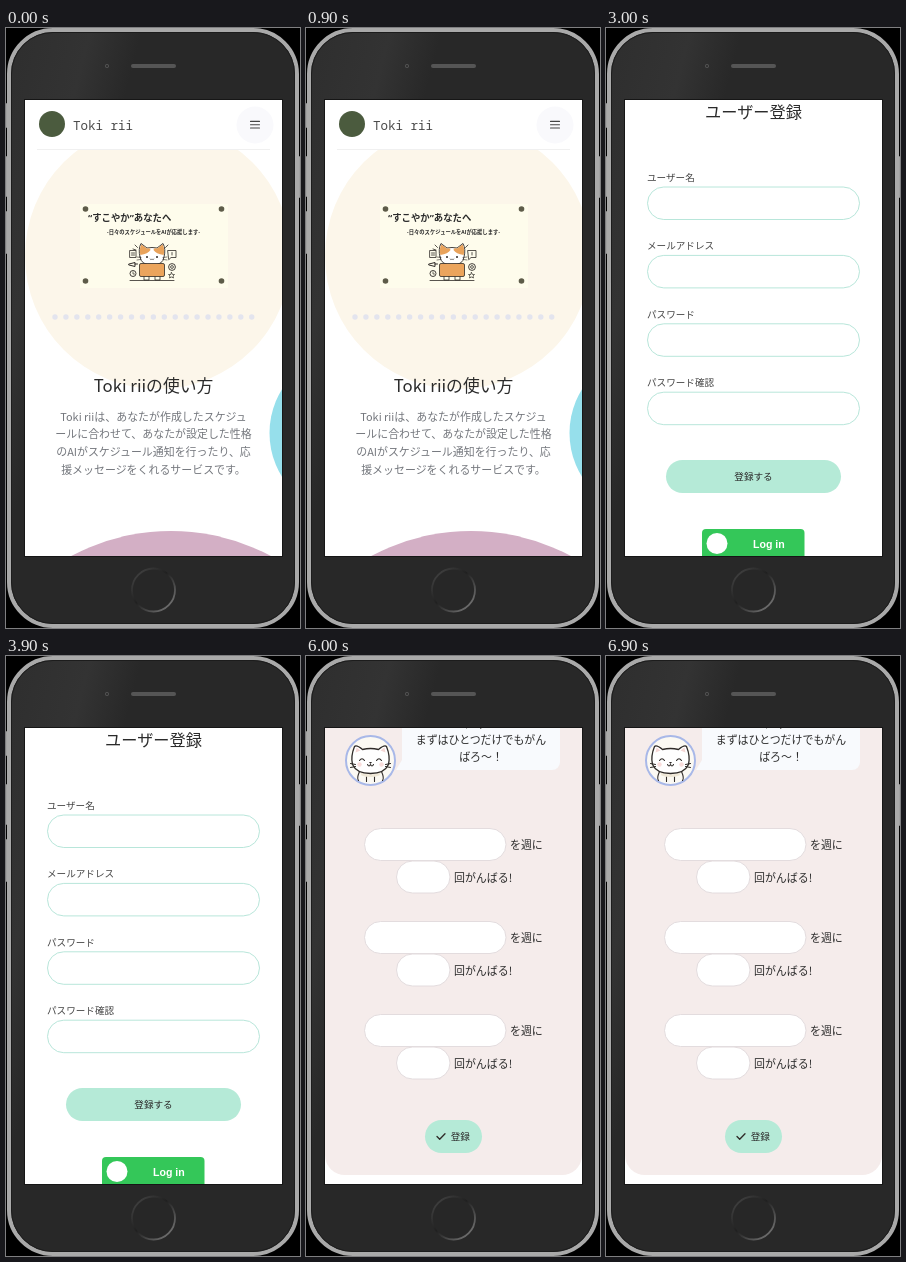
Recreate the animation shown at these times as an HTML page. Size 294x600 px, loop 7.5 s.

```html
<!DOCTYPE html>
<html lang="ja">
<head>
<meta charset="utf-8">
<title>Phone demo</title>
<style>
html, body { margin: 0; width: 100%; height: 100%; overflow: hidden; background: #000; }
svg { display: block; width: 294px; height: 600px; }
text { font-family: "Noto Sans CJK JP", "Noto Sans", sans-serif; fill: #2b2b2b; }
.mono { font-family: "Noto Sans Mono", monospace; }
.banner { font-family: "Open Sans", "Noto Sans CJK JP", sans-serif; }
.latin { font-family: "Liberation Sans", Arial, sans-serif; }
.ink { fill: none; stroke: #2f2b28; stroke-linecap: round; stroke-linejoin: round; }
</style>
</head>
<body>
<svg id="stage" viewBox="0 0 294 600"></svg>
<script>
const STEP = 1500;
const NAME = 'Toki rii';

const text = (x, y, size, str, attrs = '') =>
  `<text x="${x}" y="${y}" font-size="${size}" ${attrs}>${str}</text>`;
const mid = (x, y, size, str, attrs = '') => text(x, y, size, str, `text-anchor="middle" ${attrs}`);
const rect = (x, y, w, h, r, fill, attrs = '') =>
  `<rect x="${x}" y="${y}" width="${w}" height="${h}" rx="${r}" fill="${fill}" ${attrs}/>`;
const circle = (x, y, r, fill, attrs = '') =>
  `<circle cx="${x}" cy="${y}" r="${r}" fill="${fill}" ${attrs}/>`;
const ink = (d, width = 1, attrs = '') => `<path class="ink" stroke-width="${width}" d="${d}" ${attrs}/>`;
const at = (x, y, body) => `<g transform="translate(${x} ${y})">${body}</g>`;
const lines = (x, y, gap, size, rows, attrs) =>
  rows.map((row, i) => mid(x, y + i * gap, size, row, attrs)).join('');
const field = (x, y, w, h, stroke) => rect(x, y, w, h, h / 2, '#fff', `stroke="${stroke}"`);
const check = (x, y) => ink(`M${x - 4} ${y}l2.7 2.8 5.3-5.6`, 1.3);

const header = dy => at(0, dy,
  circle(46, 96, 13, '#4b5b3e') +
  text(67, 102, 12.5, NAME, 'class="mono" fill-opacity=".85"') +
  circle(249, 97, 18.5, '#f9f9fc') +
  ink('M244.5 93.4h9M244.5 96.7h9M244.5 100h9', 1.1, 'style="stroke:#444"'));

const helperCat =
  ink('M138 248v4h5v-4M149 248v4h5v-4M124 252.5h44M129 217l2.5 2.5M127 221l3 1M162 217l-2.5 2.5', .8) +
  `<path class="ink" style="fill:#fff" stroke-width=".9" d="M134 229Q132 221 135 215.5L141 220Q146 219 151 220L157 215.5Q160 221 158 229Q157 237 146 237Q135 237 134 229Z"/>` +
  `<path fill="#e9a35b" d="M134.3 227Q133 221 135.4 216.5L141 220.5Q144.5 219.5 144.5 222Q142 226 134.3 227ZM157.7 227Q159 221 156.6 216.5L151 220.5Q147.5 219.5 147.5 222Q150 226 157.7 227Z"/>` +
  circle(141, 229, 1, '#2f2b28') + circle(151, 229, 1, '#2f2b28') +
  ink('M144 231q1 1.6 2 0q1 1.6 2 0M131 229l4 .5M131 232l4-.6M161 229l-4 .5M161 232l-4-.6', .6) +
  rect(133.5, 235.5, 25, 13, 1.5, '#eba45d', 'stroke="#2f2b28" stroke-width=".8"');

const gadgets =
  ink('M124 222.5h6v7h-6zM125.5 225h3M125.5 227h3M162 222.5h8v7h-5l-2 2zM166 224.5v2.5', .8) +
  ink('M123 236l6-1.5v4l-6-1.5zM129 236h2.5', 1) +
  circle(127, 245.5, 3, 'none', 'stroke="#2f2b28" stroke-width=".9"') + ink('M127 244v2h1.5', .7) +
  circle(166, 239, 3.4, 'none', 'stroke="#2f2b28" stroke-width=".9"') +
  circle(166, 239, 1.4, 'none', 'stroke="#2f2b28" stroke-width=".8"') +
  ink('M165.5 244.5l1 2h2l-1.5 1.5.5 2-2-1-2 1 .5-2-1.5-1.5h2z', .7);

const banner =
  rect(74, 176, 148, 84, 0, '#fefcec') +
  [79.5, 215.5].map(x => [181, 253].map(y => circle(x, y, 2.8, '#5d5b49')).join('')).join('') +
  text(82, 193, 9.4, '“すこやか”あなたへ', 'class="banner" font-weight="700"') +
  mid(147.5, 206, 5.3, '-日々のスケジュールをAIが応援します-', 'font-weight="700"') +
  helperCat + gadgets;

const dots = Array.from({ length: 19 }, (_, i) => circle(49 + i * 10.93, 289, 2.7, '#e3e4ee')).join('');

const home =
  circle(152, 228, 133, '#fcf6ea') +
  rect(19, 72, 257, 49, 0, '#fff') + rect(31, 121, 233, 1, 0, '#f0f0f0') +
  header(0) + banner + dots +
  circle(346.5, 405, 83, '#96dfeb') + circle(165, 715, 212, '#d3afc5') +
  mid(147.5, 364, 16.8, NAME + 'の使い方') +
  lines(147.5, 392.5, 17.8, 10.95, [
    NAME + 'は、あなたが作成したスケジュ',
    'ールに合わせて、あなたが設定した性格',
    'のAIがスケジュール通知を行ったり、応',
    '援メッセージをくれるサービスです。'
  ], 'style="fill:#74777d"');

const menu =
  rect(127, 115, 143, 134, 10, '#f8fafd', 'filter="url(#soft)"') +
  ink('M152.5 142h5M155.5 139.5l2.5 2.5-2.5 2.5M158.5 138h2.5v8h-2.5', 1.5) +
  text(168, 145.5, 9.5, 'ログイン') +
  circle(157, 180.5, 2.4, '#2b2b2b') +
  '<path fill="#2b2b2b" d="M152.5 187.5q0-4 4.5-4t4.5 4z"/>' + ink('M161 182h4M163 180v4', 1.2) +
  text(170, 186.5, 9.6, 'ユーザー登録') +
  circle(157, 224, 4.5, 'none', 'stroke="#2b2b2b"') +
  ink('M155.5 222.8q0-1.5 1.5-1.5t1.5 1.3q0 .9-1.5 1.6v.4M157 226.3v.1', 1) +
  text(168, 227.5, 9.5, 'お問い合わせ');

const signup =
  mid(147.5, 90, 16.2, 'ユーザー登録') +
  ['ユーザー名', 'メールアドレス', 'パスワード', 'パスワード確認'].map((label, i) =>
    at(0, i * 68.4, text(41, 153, 9.6, label, 'style="fill:#444"') +
      field(41.5, 159, 212, 32.5, '#b8e6da'))).join('') +
  rect(60, 432, 175, 33, 16.5, '#b5ead7') +
  mid(147.5, 452.3, 9.6, '登録する', 'font-weight="500"') +
  rect(96, 501, 102.5, 34, 4, '#34c759') + circle(111, 515.5, 10.5, '#fff') +
  text(147, 520, 10.6, 'Log in', 'class="latin" font-weight="700" style="fill:#fff"');

const avatar = y => at(64.5, y,
  circle(0, 0, 24.5, '#fbf9f3', 'stroke="#a8b8e8" stroke-width="2"') +
  ink('M-11 11Q-14 18-12 20M11 11Q14 18 12 20M-4 16v5M4 16v5', 1.1) +
  '<path fill="#eee7d6" d="M-10 12Q0 16 10 12L9 15Q0 18-9 15Z"/>' +
  ink('M-18 4Q-20-4-16-14Q-14-16-8-11Q0-13 8-11Q14-16 16-14Q20-4 18 4Q14 13 0 13Q-14 13-18 4Z', 1.3, 'style="fill:#fff"') +
  '<path fill="#f5d7d5" d="M-15-8L-14-13L-10-10ZM15-8L14-13L10-10Z"/>' +
  circle(-11, 4, 2.2, '#f9dcda') + circle(11, 4, 2.2, '#f9dcda') +
  ink('M-11 0q2.5-3.5 5 0M6 0q2.5-3.5 5 0M-3 4q1.5 3 3 0q1.5 3 3 0M-20 3l5 1M-20 7l5-1M20 3l-5 1M20 7l-5-1', 1.1) +
  '<path fill="#2f2b28" d="M-1.5 1.5h3L0 3.5Z"/>');

const saveButton = y =>
  rect(119, y, 57, 33, 16.5, '#b5ead7') + check(135, y + 16.5) +
  text(144.7, y + 20, 9.6, '登録', 'font-weight="500"');

const welcome =
  header(-23) +
  rect(19.5, 96.5, 256, 36.5, 4, '#f0fcf4', 'stroke="#b9ebd4"') +
  circle(35.5, 115.5, 4.8, '#214a38') +
  ink('M33.3 115.6l1.6 1.6 2.9-3.2', 1.2, 'style="stroke:#fff"') +
  text(43, 119, 9.55, 'ユーザー登録が完了しました', 'style="fill:#2c4638"') +
  rect(19, 166, 257, 350.5, 20, '#f5eceb') +
  rect(96, 205, 158, 125, 8, '#f8fafd') +
  '<path fill="#f8fafd" d="M96 320L90 330H104Z"/>' +
  lines(175, 222.5, 16.45, 10.95, [
    'はじめまして！ 登録してく', 'れてありがとにゃ〜！', 'これから一緒にがんばるに', 'ゃ',
    'まずは、キミがなりたい理', '想のジブンを教えてほしい', 'にゃ！'
  ]) +
  avatar(321) +
  field(41.5, 347.5, 212, 32.5, '#e0dcdf') +
  text(54, 368, 10.9, '例 : 今の体重から5キロ痩せたい...など', 'style="fill:#777"') +
  saveButton(399) +
  rect(95, 456, 106, 33, 16.5, '#d0c2d9') +
  ink('M108.5 469.5l3 3-3 3M112.5 469.5l3 3-3 3', 1.3) +
  text(121, 476, 9.6, 'あとで設定する', 'font-weight="500"');

const goals =
  rect(19, 40, 257, 479, 20, '#f5eceb') +
  rect(96, 40, 158, 74, 8, '#f8fafd') +
  '<path fill="#f8fafd" d="M96 104L90 114H104Z"/>' +
  lines(175, 71.5, 16.5, 10.95, ['にゃ！', 'まずはひとつだけでもがん', 'ばろ〜！']) +
  avatar(104.5) +
  [0, 93, 186].map(dy => at(0, dy,
    field(58.5, 172.5, 141.5, 32, '#e3dcde') + text(204, 193, 10.95, 'を週に') +
    field(90.5, 205, 53.5, 32, '#e3dcde') + text(148, 225.5, 10.95, '回がんばる!'))).join('') +
  saveButton(464);

const phone =
  rect(0, 75, 4, 25, 1, '#a2a2a2') + rect(0, 128, 4, 41, 1, '#a2a2a2') +
  rect(0, 183, 4, 43, 1, '#a2a2a2') + rect(290, 128, 4, 42, 1, '#a2a2a2') +
  rect(3, 2, 288, 596, 44, 'url(#body)', 'stroke="#a9a9a9" stroke-width="4"') +
  rect(5.5, 4.5, 283, 591, 41.5, 'none', 'stroke="#1c1c1c"') +
  circle(101, 38, 2, '#555') + circle(101, 38, .9, '#222') +
  rect(125, 36, 45, 4, 2, '#555') +
  circle(147.5, 562, 21.5, '#272727', 'stroke="url(#ring)" stroke-width="1.8"') +
  rect(18, 71, 259, 458, 0, '#161616') + rect(19, 72, 257, 456, 0, '#fff');

const defs = `<defs>
  <clipPath id="screen">${rect(19, 72, 257, 456, 0, '#fff')}</clipPath>
  <linearGradient id="body" x1="0" y1="0" x2=".55" y2=".3">
    <stop stop-color="#2e2e2e"/><stop offset=".4" stop-color="#333"/><stop offset=".65" stop-color="#282828"/>
  </linearGradient>
  <linearGradient id="ring" x1="0" y1="0" x2="1" y2="1">
    <stop stop-color="#4a4a4a"/><stop offset=".45" stop-color="#202020"/><stop offset="1" stop-color="#858585"/>
  </linearGradient>
  <filter id="soft" x="-10%" y="-10%" width="120%" height="120%">
    <feDropShadow dx="0" dy="1" stdDeviation="1.2" flood-color="#000" flood-opacity=".1"/>
  </filter>
</defs>`;

const scenes = [home, home + menu, signup, welcome, goals];
const stage = document.getElementById('stage');
stage.innerHTML = defs + phone + '<g clip-path="url(#screen)">' +
  scenes.map(body => `<g class="scene" display="none">${body}</g>`).join('') + '</g>';
const layers = [...stage.querySelectorAll('.scene')];

const start = performance.now();
function draw(now) {
  const current = Math.floor(Math.max(0, now - start) / STEP) % layers.length;
  layers.forEach((layer, i) => layer.setAttribute('display', i === current ? 'inline' : 'none'));
  requestAnimationFrame(draw);
}
draw(start);
</script>
</body>
</html>
```
